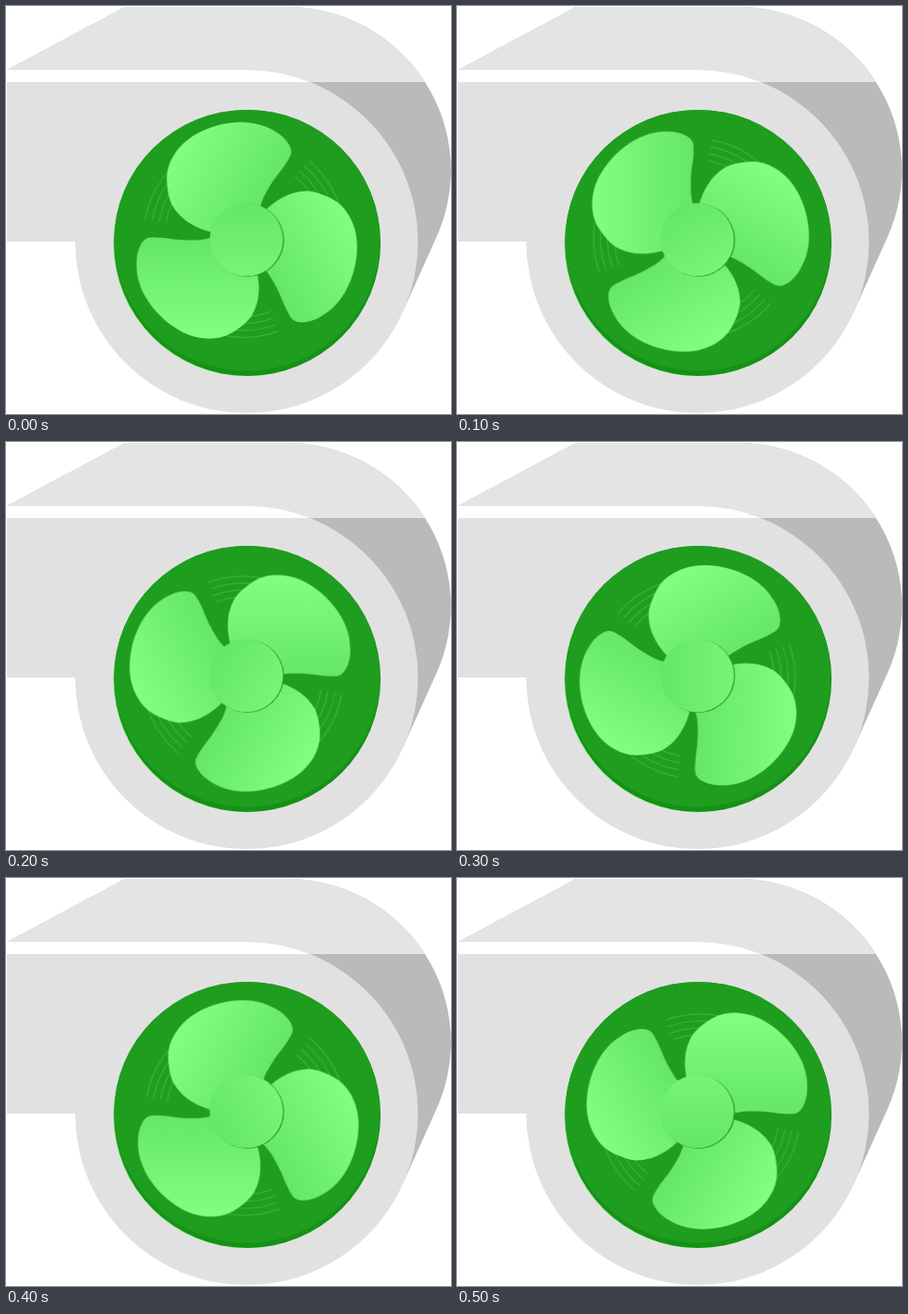
These frames come from a looping animation (479 px wide and 440 px high, 0.6 s). An HTML page:

```html
<!DOCTYPE html>
<html lang="en">
<head>
<meta charset="utf-8">
<title>Blower fan</title>
<style>
  html, body { margin: 0; width: 100%; height: 100%; overflow: hidden; background: #fff; }
  svg { display: block; width: 479px; height: 440px; }
  .spin { transform-origin: 0 0; }
  .streaks { fill: none; stroke: #3db83d; stroke-width: 1; stroke-dasharray: 38 322; stroke-dashoffset: -190; }
</style>
</head>
<body>
<svg viewBox="0 0 479 440">
  <defs>
    <linearGradient id="bladeFill" gradientUnits="userSpaceOnUse" x1="0" y1="0" x2="-95" y2="-55">
      <stop offset="0" stop-color="#66e666"/>
      <stop offset="1" stop-color="#80ff80"/>
    </linearGradient>
    <linearGradient id="hubFill" x1="0" y1="0" x2="0" y2="1">
      <stop offset="0" stop-color="#66e666"/>
      <stop offset="1" stop-color="#76f576"/>
    </linearGradient>
    <clipPath id="strip"><rect width="479" height="82"/></clipPath>
    <path id="front" d="M1 69H259A184.5 185 0 1 1 74.5 254H1Z"/>
    <path id="back" d="M1 69L128 1H303A176 176 0 0 1 463.5 249L427 330L259 254V69Z"/>
    <path id="blade" fill="url(#bladeFill)" d="M-30-4
      C-38-6-46-8-55.6-13.5
      C-66-19.5-72-26-77-34
      C-81-41-83-53.5-83-64
      C-83-72-80.5-79.5-76.5-86.5
      C-70.5-97-62-105-51.5-111
      C-38-118.8-20-124-3-124
      C11-124 22.5-120.5 32-115
      C39.5-110.7 45-106 48.5-100
      C50-97.4 51-95 51-92
      C51-89 49.5-86.5 47.5-83
      C42-73.5 35.5-67 30.4-59
      C26-52 22.5-46 20.4-41
      C18-35 17-30 15-24Z"/>
    <g id="streaks" class="streaks">
      <circle r="108" pathLength="360"/>
      <circle r="100.5" pathLength="360"/>
      <circle r="93" pathLength="360"/>
      <circle r="85.5" pathLength="360"/>
    </g>
  </defs>

  <!-- housing -->
  <use href="#back" fill="#bababa"/>
  <use href="#back" fill="#e2e4e6" clip-path="url(#strip)"/>
  <use href="#front" fill="#e1e1e1"/>
  <use href="#front" fill="#fff" clip-path="url(#strip)"/>

  <!-- opening -->
  <circle cx="258.7" cy="256" r="143.2" fill="#7df07d"/>
  <circle cx="259.7" cy="255.5" r="143.5" fill="#179017"/>
  <ellipse cx="259.5" cy="252.7" rx="143" ry="140.8" fill="#1f9d1f"/>

  <!-- the blades sit slightly off the axle, so they wobble -->
  <g transform="translate(258.7 252)">
    <g class="spin">
      <g transform="translate(-2.7 -2.8)">
        <use href="#streaks"/>
        <use href="#streaks" transform="rotate(120)"/>
        <use href="#streaks" transform="rotate(240)"/>
        <use href="#blade"/>
        <use href="#blade" transform="rotate(120)"/>
        <use href="#blade" transform="rotate(240)"/>
      </g>
    </g>
    <circle cx="1" cy=".4" r="39.5" fill="#1a921a"/>
    <circle class="spin" r="39.5" fill="url(#hubFill)"/>
  </g>
</svg>
<script>
  const LOOP = 600;
  const angles = [0, -30, -60, -90, -120, -180];
  const pose = (angle, i) => ({
    offset: i / angles.length,
    transform: `rotate(${angle}deg)`,
    easing: 'step-end'
  });
  const steps = [...angles.map(pose), { offset: 1, transform: 'rotate(-360deg)' }];

  for (const part of document.querySelectorAll('.spin')) {
    part.animate(steps, { duration: LOOP, iterations: Infinity }).startTime = 0;
  }
</script>
</body>
</html>
```
